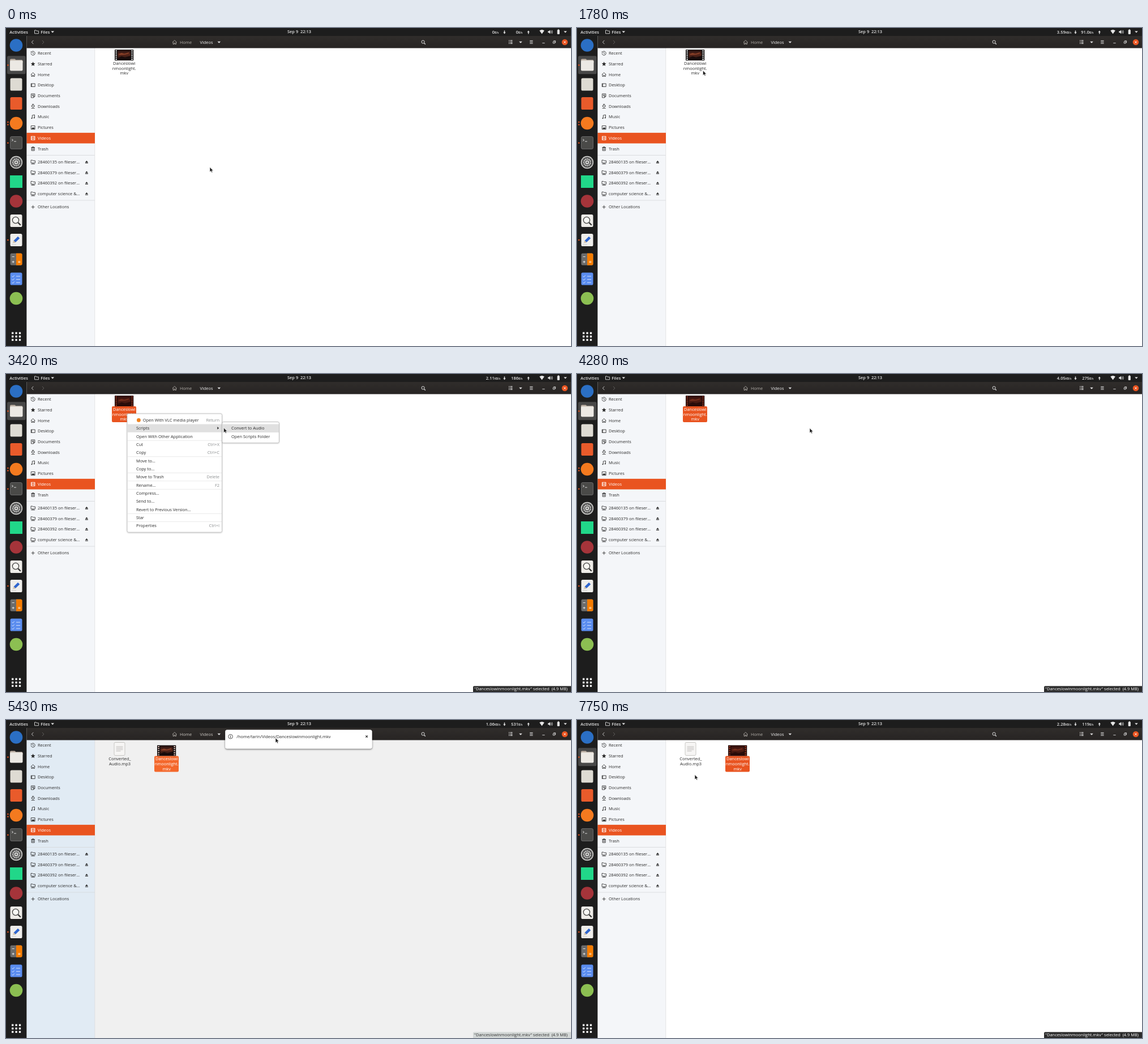
An HTML page for the animation above (8 s loop, 998 px wide and 561 px high).

```html
<!DOCTYPE html>
<html lang="en">
<head>
<meta charset="utf-8">
<title>File manager</title>
<style>
  html, body { margin: 0; width: 100%; height: 100%; overflow: hidden; background: #fff; }
  svg { display: block; width: 100vw; height: 100vh; }
  text { font-family: "Open Sans", "Noto Sans", sans-serif; font-size: 7.45px; white-space: pre; }
  .bold { font-weight: 600; }
  .line { fill: none; stroke-width: .85; stroke-linejoin: round; }
</style>
</head>
<body>
<svg id="stage" viewBox="0 0 998 561" xmlns="http://www.w3.org/2000/svg"></svg>
<script>
const LOOP = 8000;
const ORANGE = '#e95420';
const INK = '#2b2b2b';
const FILE = 'Danceslowinmoonlight.mkv';
const stage = document.getElementById('stage');

// ---- markup helpers; text is placed by its vertical centre ----
const rect = (x, y, w, h, fill, extra = '') =>
  `<rect x="${x}" y="${y}" width="${w}" height="${h}" fill="${fill}" ${extra}/>`;
const circle = (x, y, r, fill, extra = '') =>
  `<circle cx="${x}" cy="${y}" r="${r}" fill="${fill}" ${extra}/>`;
const text = (x, y, str, fill, extra = '') =>
  `<text x="${x}" y="${y + 2.6}" fill="${fill}" ${extra}>${str}</text>`;
const line = (d, stroke, extra = '') => `<path class="line" d="${d}" stroke="${stroke}" ${extra}/>`;
const fill = (d, color, extra = '') => `<path d="${d}" fill="${color}" ${extra}/>`;
const at = (x, y, body) => `<g transform="translate(${x} ${y})">${body}</g>`;
const caret = (x, y, color) => fill(`M${x - 2.8} ${y - 1.3}h5.6l-2.8 3z`, color);
const middle = 'text-anchor="middle"';
const end = 'text-anchor="end"';

// ---- sidebar ----
const glyphs = {
  clock: 'M-3.5 0a3.5 3.5 0 1 0 1-2.5M-3.5-3.2v1.6h1.6M0-2v2.2l1.5 1',
  house: 'M-3.8.3L0-3.3 3.8.3M-2.7-.5v4h1.9v-2h1.6v2h1.9v-4',
  desktop: 'M-3.5-2.6h7v5.4h-7zM-2.2-2.6v5.4',
  doc: 'M-3.2-3.3h6.4v4.6l-2.2 2.2h-4.2zM-1.8-1.4h3.6M-1.8.2h3.6M1 3.4V1.2h2.2',
  down: 'M-1.2-3.6h2.4v3H3L0 2.2-3-.6h1.8zM-3 3.5h6',
  note: 'M-1.4 2.4v-5.2l4.2-.8v5.2',
  image: 'M-3.4-3h6.8v6.2h-6.8z',
  film: 'M-3.4-3h6.8v6.2h-6.8zM-2-3v6.2M2-3v6.2M-2 .1h4',
  bin: 'M-2.5-1.6h5v5h-5zM-3.3-2.4h6.6M-1-3.4h2M-.9-.2v2.4M.9-.2v2.4',
  share: 'M-3.6 1.7v-4.9h2.6l.8 1h4v3.9zM0 1.7v1.9M-3.4 3.6h6.8',
  plus: 'M-3 0h6M0-3v6'
};
const solids = {
  note: 'M-3.2 2.4a1 1 0 1 0 2 0a1 1 0 1 0-2 0M1 1.8a1 1 0 1 0 2 0a1 1 0 1 0-2 0',
  image: 'M-2.6 2.4L-.8-.4l1.2 1.3L1.6-.8l1.2 3.2z',
  star: 'M0-3.9L1.1-1.2 3.9-1 1.8.8 2.4 3.6 0 2.1-2.4 3.6-1.8.8-3.9-1-1.1-1.2z'
};
const glyph = (name, color) =>
  (glyphs[name] ? line(glyphs[name], color) : '') + (solids[name] ? fill(solids[name], color) : '');

const ITEM = 18.7;
function sidebar() {
  const places = [['clock', 'Recent'], ['star', 'Starred'], ['house', 'Home'], ['desktop', 'Desktop'],
    ['doc', 'Documents'], ['down', 'Downloads'], ['note', 'Music'], ['image', 'Pictures'],
    ['film', 'Videos'], ['bin', 'Trash']];
  const shares = ['28460135 on fileser…', '28460379 on fileser…', '28460392 on fileser…', 'computer science &amp;…'];
  const row = (icon, label, y, color) => at(47.7, y, glyph(icon, color)) + text(56, y, label, color);
  let out = rect(36.4, 35, 120.6, 526, '#f4f6f9', 'id="side"') + rect(156.6, 35, .6, 526, '#d6d6d6')
    + rect(36.4, 184.85, 120.6, ITEM, ORANGE, 'id="active"');
  places.forEach(([icon, label], i) => {
    out += row(icon, label, 44.6 + i * ITEM, label === 'Videos' ? '#fff' : INK);
  });
  shares.forEach((label, i) => {
    const y = 236.3 + i * ITEM;
    out += row('share', label, y, INK)
      + fill(`M139.9 ${y + .6}l2.5-3 2.5 3zM139.9 ${y + 1.3}h5v1.1h-5z`, INK);
  });
  return out + rect(36.4, 224, 120.3, .8, '#d5d7da') + rect(36.4, 303.6, 120.3, .8, '#d5d7da')
    + row('plus', 'Other Locations', 315.8, INK);
}

// ---- dock ----
function dock() {
  const tile = (color, extra = '') => rect(-10.5, -11, 21, 22, color, 'rx="2.6" ' + extra);
  const blob = color => circle(0, 0, 11.3, color);
  const teeth = 'stroke="#555" stroke-width="2" stroke-dasharray="1.9 1.9"';
  const icons = [
    [30.5, blob('#2b6fc4')],
    [65, rect(-11, -10.5, 10, 8, '#b9aca0', 'rx="2"') + rect(-11, -8.8, 22.5, 6, '#c9beb4', 'rx="2"')
      + rect(-11, -7.6, 22.5, 18, '#ece9e4', 'rx="2"')],
    [99.5, tile('#dedbd3')],
    [133, tile('#e95b2b')],
    [168, blob('#f47a1f')],
    [202.5, tile('#4a4a48', 'stroke="#777" stroke-width=".8"') + line('M-8-6.5l2.6 1.8-2.6 1.8M-4-2.4h4', '#eee')],
    [237, circle(0, 0, 11.2, '#c9c9c7') + circle(0, 0, 9.6, '#555') + circle(0, 0, 7, '#d8d8d6', teeth)
      + circle(0, 0, 5.2, '#555') + circle(0, 0, 3.4, '#d8d8d6') + circle(0, 0, 1.4, '#555')],
    [271, rect(-11, -11, 22, 22, '#21d789')],
    [305.5, blob('#a5343a')],
    [340, tile('#eeece8') + circle(-1, -1, 5.6, '#f8f8f4', 'stroke="#444" stroke-width="1.3"')
      + line('M3.4 3.4l4.4 4.4', '#333', 'style="stroke-width:2.2"')],
    [374, tile('#efeeeb') + fill('M-5.5 5.2l1.2-4.2L3-6.3 6.2-3.1-1.1 4z', '#2f66cf')
      + fill('M-5.5 5.2l1.2-4.2 3.2 3z', '#e7c99b') + line('M-8 8h8', '#c6c6c6')],
    [408, rect(-10.5, -10.5, 21, 21, '#6c6c6c', 'rx="2.5"')
      + fill('M0-10.5h8a2.5 2.5 0 0 1 2.5 2.5v16a2.5 2.5 0 0 1-2.5 2.5h-8z', '#f57c00')
      + line('M-7.3-4.5h4M-7.3 4.6h4M-5.3 2.6v4M3.4 3.8h4M3.4 5.6h4', '#fff')],
    [442.5, tile('#5b8def') + line('M-7.5-4.8l1.6 1.6 2.6-3M-7.5.8l1.6 1.6 2.6-3M-7.5 6.3l1.6 1.6 2.6-3M0-4.5h7M0 1.1h7M0 6.6h7', '#e8f0ff')],
    [477, blob('#8cbf52')]
  ];
  let out = rect(0, 13, 36.4, 548, '#1d1d1d') + rect(2, 49.3, 32.5, 32, '#484848', 'rx="2.5" id="focus"');
  icons.forEach(([y, body]) => { out += at(18, y, body); });
  [65.5, 166, 170.5, 202.7, 374].forEach(y => { out += circle(3.4, y, 1.3, ORANGE); });
  for (let i = 0; i < 9; i++) {
    out += rect(10 + i % 3 * 6.4, 536.5 + Math.floor(i / 3) * 6, 3.4, 3.4, '#f2f2f2', 'rx=".6"');
  }
  return out;
}

// ---- top panel and window header ----
function bars() {
  const c = '#e6e6e6';
  const arrow = (x, dir) =>
    fill('M-.7-3h1.4v3h1.5L0 3-2.2 0h1.5z', c, `transform="translate(${x} 7.5) scale(1 ${dir})"`);
  const rate = id => `<text id="${id}" class="bold" y="10.2" fill="${c}" ${end}><tspan></tspan><tspan style="font-size:4.9px"></tspan></text>`;
  return rect(0, 0, 998, 14, '#1d1d1d')
    + text(6.3, 7, 'Activities', c, 'class="bold"')
    + line('M50.5 9.8V4h2.6l.9 1.2h3.6v4.6z', c) + text(61.3, 7, 'Files', c, 'class="bold"') + caret(82.3, 6.8, c)
    + text(497, 6.8, 'Sep 9  22:13', c, 'class="bold"')
    + rate('down') + rate('up') + arrow(880.5, 1) + arrow(922.8, -1)
    + fill('M942.3 4.6q4.3-3 8.6 0l-4.3 6z', c)
    + fill('M957.3 5.6h1.7l2.3-2.2v7l-2.3-2.2h-1.7z', c) + line('M962.6 5q1.3 1.9 0 3.9M964.2 3.8q2.2 3.1 0 6.3', c)
    + rect(973.7, 3.3, 4.2, 7.6, c, 'rx=".8"') + rect(974.9, 2.2, 1.8, 1.4, c) + caret(988, 6.8, c)
    + rect(36.4, 14, 961.6, 21.5, 'url(#head)')
    + line('M48.4 21.8l-3 3.2 3 3.2', '#e0e0e0') + line('M63.9 21.8l3 3.2-3 3.2', '#6a6765')
    + at(297.8, 25, line(glyphs.house, '#b5b1ac')) + text(307, 25, 'Home', '#b5b1ac', 'id="home"')
    + text(342.5, 25, 'Videos', '#f2f2f2', 'id="folder"') + caret(376.3, 25, c)
    + line('M738.6 26.6l2.2 2.2', c, 'style="stroke-width:1.3"') + circle(736.6, 24.5, 2.6, 'none', `stroke="${c}"`)
    + line('M888 22.2h1.4M888 24.8h1.4M888 27.4h1.4M890.6 22.2h4M890.6 24.8h4M890.6 27.4h4', c, 'style="stroke-width:1.2"')
    + caret(909, 25, c) + line('M925.2 22.4h5.4M925.2 24.8h5.4M925.2 27.2h5.4', c, 'style="stroke-width:1"')
    + line('M947.3 26.6h4.4M966.3 24h3v3h-3zM967.4 23v-.4h3.2v3.2h-.6', c)
    + circle(987, 25, 5.3, ORANGE) + line('M985.2 23.2l3.6 3.6M988.8 23.2l-3.6 3.6', '#fff');
}

// ---- files ----
function files() {
  let holes = '';
  for (let i = 0; i < 5; i++) {
    const y = 39.6 + i * 3.6;
    holes += `M193.3 ${y}h2.6v1.9h-2.6zM221.3 ${y}h2.6v1.9h-2.6z`;
  }
  const lines = ['Danceslowi', 'nmoonlight.', 'mkv'];
  const video = rect(192, 38.2, 33.2, 19, '#0b0808')
    + rect(197.3, 39, 22.6, 17.4, 'url(#still)') + fill('M199 46l5-2 5 1.5 8-2.5v2l-7 2-10 .4z', '#8a4128')
    + fill('M197.3 53l7-3 6 2 9.6-3v7.4h-22.6z', '#170b0b')
    + `<path id="holes" d="${holes}"/>` + rect(192, 38.2, 33.2, 19, '#4a0c06', 'id="tint"')
    + rect(187, 57, 43, 28, ORANGE, 'rx="2" id="label"')
    + lines.map((s, i) => text(208.7, 62.4 + i * 8.7, s, INK, middle + ' class="name"')).join('');
  const audio = rect(191, 39.5, 19, 23, '#f6f5f4', 'rx="2" stroke="#bdbbb8" stroke-width=".8"')
    + line('M194.5 47h12M194.5 49.6h12M194.5 52.2h12M194.5 54.8h8', '#b4b2af')
    + text(201, 68.8, 'Converted_', INK, middle) + text(201, 77.4, 'Audio.mp3', INK, middle);
  return rect(157, 35, 841, 526, '#fff', 'id="content"') + `<g id="audio">${audio}</g><g id="video">${video}</g>`;
}

const status = () => '<g id="status">' + fill('M825 561v-8.5a2 2 0 0 1 2-2h171v10.5z', INK, 'id="statusBox"')
  + text(992, 555.8, `"${FILE}" selected  (4.9 MB)`, '#fff', end + ' id="statusText"') + '</g>';

// ---- context menu ----
const ROW = 14.33, MENU_TOP = 74.2;
const rowY = i => MENU_TOP + ROW * (i + .5);
function menu() {
  const rows = [['Open With VLC media player', 'Return'], ['Scripts'], ['Open With Other Application'],
    ['Cut', 'Ctrl+X'], ['Copy', 'Ctrl+C'], ['Move to…'], ['Copy to…'], ['Move to Trash', 'Delete'],
    ['Rename…', 'F2'], ['Compress…'], ['Send to…'], ['Revert to Previous Version…'], ['Star'], ['Properties', 'Ctrl+I']];
  const frame = 'rx="2.5" stroke="#b4b4b4" stroke-width=".8" filter="url(#soft)"';
  const hover = (id, x, w) => rect(x, 0, w, ROW, '#e0e0e0', `id="${id}"`);
  let out = rect(214, 70, 167.6, 209.2, '#fff', frame) + hover('hover', 214.4, 166.8);
  rows.forEach(([label, key], i) => {
    out += text(i ? 230 : 241.7, rowY(i), label, INK) + (key ? text(377, rowY(i), key, '#8b8e8f', end) : '');
  });
  [3, 5, 7, 8, 9, 12, 13].forEach(i => { out += rect(214.4, MENU_TOP + ROW * i - .3, 166.8, .6, '#dcdcdc'); });
  out += circle(234.4, 81.4, 3.4, '#ee8220') + fill('M373.3 93l2.8 2.4-2.8 2.4z', INK);
  const sub = rect(381.8, 84.6, 100.6, 37, '#fff', frame) + hover('subHover', 382.2, 99.8)
    + text(398, rowY(1), 'Convert to Audio', INK) + text(398, rowY(2), 'Open Scripts Folder', INK)
    + rect(382.2, MENU_TOP + ROW * 2 - .3, 99.8, .6, '#dcdcdc');
  return `<g id="menu">${out}<g id="sub">${sub}</g></g>`;
}

const dialog = () => '<g id="dialog">'
  + rect(387.2, 17.2, 259.4, 33.2, '#fff', 'rx="3.5" filter="url(#drop)"')
  + circle(396.6, 29.2, 3.8, 'none', `stroke="${INK}" stroke-width=".8"`)
  + rect(396.1, 28.6, 1, 2.8, INK) + rect(396.1, 26.8, 1, 1, INK)
  + text(407.3, 29.4, '/home/tarin/Videos/' + FILE, INK)
  + line('M635.3 27.3l3.6 3.6M638.9 27.3l-3.6 3.6', INK, 'style="stroke-width:1.1"') + '</g>';

stage.innerHTML = `<defs>
  <linearGradient id="head" x2="0" y2="1"><stop stop-color="#302d2b"/><stop offset="1" stop-color="#272423"/></linearGradient>
  <linearGradient id="still" x2="0" y2="1"><stop stop-color="#231110"/><stop offset=".45" stop-color="#59261a"/><stop offset="1" stop-color="#1c1010"/></linearGradient>
  <filter id="soft" x="-5%" y="-10%" width="110%" height="125%"><feDropShadow dx="0" dy=".6" stdDeviation=".8" flood-opacity=".25"/></filter>
  <filter id="drop" x="-5%" y="-30%" width="110%" height="180%"><feDropShadow dx="0" dy="1.2" stdDeviation="1.6" flood-opacity=".6"/></filter>
  </defs>` + files() + status() + sidebar() + bars() + dock() + menu() + dialog()
  + '<path id="cursor" d="M0 0v8.6l2-1.8 1.3 2.8 1.5-.7-1.3-2.7h2.7z" fill="#1c1c1c" stroke="#fff" stroke-width=".6"/>';

// ---- timeline ----
const $ = id => document.getElementById(id);
const names = [...document.querySelectorAll('.name')];
const set = (id, name, value) => $(id).setAttribute(name, value);
const show = (id, on) => set(id, 'visibility', on ? 'visible' : 'hidden');
const ramp = (t, a, b) => Math.min(1, Math.max(0, (t - a) / (b - a)));
const mix = (a, b, k) => `rgb(${a.map((v, i) => Math.round(v + (b[i] - v) * k))})`;

// time, x, y of the pointer tip
const pointer = [[0, 360, 245.5], [70, 360, 245.5], [450, 285, 308], [870, 266, 171], [930, 259, 163.5],
  [1110, 259, 163.5], [1350, 250, 270], [1780, 222.5, 75], [1910, 213, 69], [2400, 213, 69],
  [2580, 241, 98], [3300, 374, 95], [3710, 410, 95], [3890, 411, 95.5], [4890, 411, 95.5],
  [5430, 476, 31.5], [5630, 478, 49], [5960, 478, 49], [6510, 213, 105], [6800, 184, 107],
  [6930, 196, 104], [7110, 198, 103], [7290, 193, 100], [7450, 208, 96.5], [LOOP, 208, 96.5]];
// time, download, upload
const rates = [[0, '0', '0'], [210, '1.24K', '119'], [1150, '3.59K', '91.0'], [2250, '1.80K', '0'],
  [3170, '2.11K', '186'], [4130, '4.05K', '275'], [5110, '1.06K', '531'], [6130, '3.10K', '227'], [7110, '2.28K', '119']];

function pointerAt(t) {
  const i = Math.max(1, pointer.findIndex(p => p[0] > t));
  const [t0, x0, y0] = pointer[i - 1], [t1, x1, y1] = pointer[i];
  const k = ramp(t, t0, t1);
  return [x0 + (x1 - x0) * k, y0 + (y1 - y0) * k];
}

function setRate(id, value, x) {
  const [number, unit] = $(id).children;
  number.textContent = value.replace('K', '');
  unit.textContent = value.includes('K') ? 'KB/s' : 'B/s';
  set(id, 'x', x);
}

function draw(t) {
  const [x, y] = pointerAt(t);
  set('cursor', 'transform', `translate(${x} ${y})`);

  const [, down, up] = rates.filter(r => r[0] <= t).pop();
  setRate('down', down, down.includes('K') ? 873.3 : 870.5);
  setRate('up', up, 912.5);

  const selected = t >= 2250, converted = t >= 4890;
  const back = ramp(t, 5150, 5300) - ramp(t, 5870, 5960);
  show('label', selected);
  names.forEach(n => n.setAttribute('fill', selected ? '#fff' : INK));
  set('label', 'fill', mix([233, 84, 32], [244, 104, 44], back));
  set('holes', 'fill', mix([240, 240, 240], [190, 80, 50], selected ? 1 - back * .7 : 0));
  set('tint', 'opacity', selected ? .35 * (1 - back) : 0);
  set('video', 'transform', converted ? 'translate(75 6.4)' : '');
  show('audio', converted);

  const row = x > 382 ? 1 : Math.floor((y - MENU_TOP) / ROW);
  show('menu', t >= 2250 && t < 4280);
  set('hover', 'y', MENU_TOP + ROW * row);
  set('hover', 'opacity', x > 214 && row >= 0 ? 1 : 0);
  set('sub', 'opacity', t >= 2800 ? 1 : 0);
  set('subHover', 'y', MENU_TOP + ROW);
  set('subHover', 'opacity', x > 382 ? 1 : 0);

  show('status', t >= 2520);
  set('statusBox', 'fill', mix([43, 43, 43], [211, 215, 214], back));
  set('statusText', 'fill', mix([255, 255, 255], [50, 50, 50], back));
  set('content', 'fill', mix([255, 255, 255], [240, 240, 240], back));
  set('side', 'fill', mix([244, 246, 249], [225, 235, 244], back));
  set('active', 'fill', mix([233, 84, 32], [243, 105, 42], ramp(t, 5870, 5950) - ramp(t, 5970, 6080)));
  set('home', 'fill', mix([181, 177, 172], [205, 201, 196], back));
  set('folder', 'fill', mix([242, 242, 242], [205, 201, 196], back));
  show('focus', t < 5150 || t >= 5900);
  show('dialog', t >= 5150 && t < 5900);
  set('dialog', 'opacity', ramp(t, 5150, 5280));
}

function tick(now) {
  draw(now % LOOP);
  requestAnimationFrame(tick);
}
draw(0);
requestAnimationFrame(tick);
</script>
</body>
</html>
```
